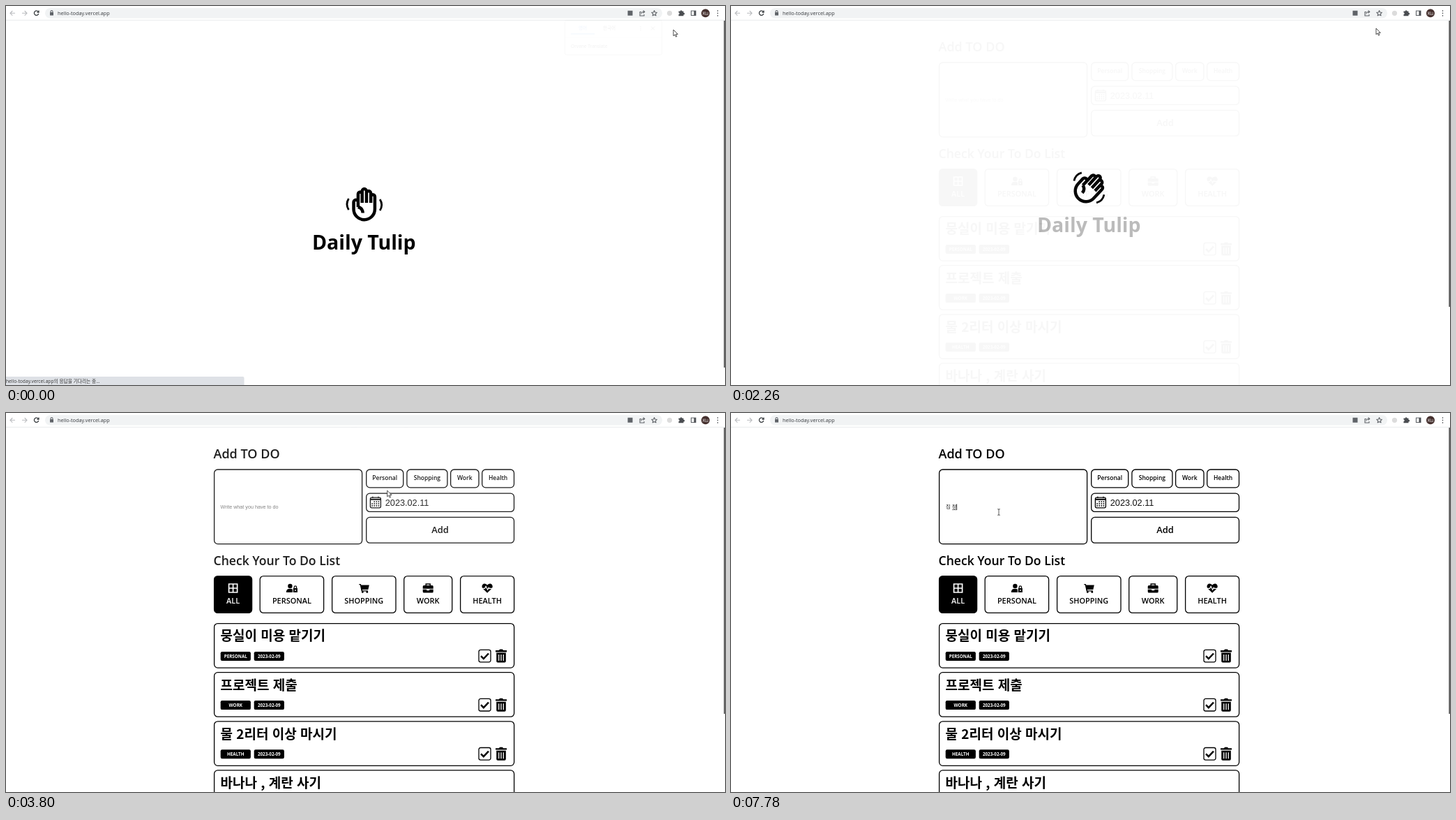
Recreate the animation shown at these times as an HTML page. Size 1031x543 px, loop 8 s.

```html
<!DOCTYPE html>
<html lang="ko">
<head>
<meta charset="utf-8">
<title>To do list</title>
<style>
html, body { margin: 0; width: 100%; height: 100%; overflow: hidden; background: #fff; }
svg { display: block; width: 1031px; height: 543px; }
text { font-family: "Open Sans", "Noto Sans", "Noto Sans CJK KR", "Noto Sans CJK", sans-serif; white-space: pre; }
.b { font-weight: 600; }
.h { font-weight: 700; }
.k { font-family: "Noto Sans CJK KR", "Noto Sans CJK", sans-serif; font-weight: 700; }
.a { font-family: "Liberation Sans", Arial, sans-serif; }
.m { text-anchor: middle; }
.line { fill: none; stroke: #000; stroke-width: 1.3; }
.tool { fill: none; stroke: #5f6368; stroke-width: 1.1; }
</style>
</head>
<body>
<svg viewBox="0 0 1031 543">
  <rect width="1031" height="543" fill="#fff"/>
  <g id="page"></g>
  <g id="typed">
    <text id="hint" class="a" x="307.5" y="137" font-size="7.2" fill="#757575">Write what you have to do</text>
    <text id="word" class="a" x="308" y="137.3" font-size="7.4" fill="#222"></text>
    <path id="under" stroke="#333" stroke-width=".7"/>
    <path id="caret" stroke="#111" stroke-width=".8"/>
  </g>

  <g id="cover">
    <rect width="1031" height="548" y="20" fill="#fff"/>
    <g id="hand" fill="none" stroke="#000" stroke-width="4.5" stroke-linejoin="round">
      <path d="M-8.800 4V-14.500a2.900 2.900 0 0 1 5.800 0M-3-2V-18.800a3.100 3.100 0 0 1 6.200 0V-2M3.200-15.800a3.100 3.100 0 0 1 6.200 0V-2M9.400-10.800a2.900 2.900 0 0 1 5.800 0V7a15.200 15.200 0 0 1-30.400 0V-3a3.200 3.200 0 0 1 6.400 0"/>
      <path d="M-9 4q6.800 1.500 7 8.500"/>
      <path d="M-22.300-8q-5 8 0 16M22.500-7q5 8 0 16" stroke-width="2.800"/>
    </g>
    <text id="name" class="m h" x="513.3" y="348.500" font-size="28.5">Daily Tulip</text>
  </g>

  <path id="thumb" stroke="#555" stroke-width="1.6"/>

  <g id="bar">
    <rect width="1031" height="20" fill="#fff"/>
    <path d="M0 20.300H1031" stroke="#e4e6e8" stroke-width=".8"/>
    <rect x="56" y="3" width="885" height="14.500" rx="7.250" fill="#f1f3f4"/>
    <path class="tool" style="stroke:#b9bbbe" d="M13 10.300H6M9.300 7L6 10.300l3.300 3.300M23 10.300h7M26.700 7l3.300 3.300-3.300 3.300"/>
    <path class="tool" style="stroke:#3c4043;stroke-width:1.300" d="M46.300 8.400A3.200 3.200 0 1 0 46.700 11M47 6.500v2.600h-2.600"/>
    <rect x="63" y="9" width="5" height="4.600" rx=".6" fill="#5f6368"/>
    <path class="tool" d="M64 9V8a1.500 1.500 0 0 1 3 0v1" stroke-width=".9"/>
    <text x="74" y="13" font-size="7.300" fill="#35383c">hello-today.vercel.app</text>
    <rect id="glow" x="886.500" y="3.500" width="17" height="13.500" rx="6.750" fill="#a9acb0"/>
    <rect x="891.500" y="6.700" width="7" height="7" fill="#5f6368"/>
    <path class="tool" d="M911 8.500h-2v5.500h6v-2M910.700 11.500q.3-3 4.500-3.200M913.600 6.300l2.200 2-2.200 2"/>
    <path class="tool" d="M929.600 6.500l1.100 2.500 2.700.3-2 1.800.6 2.700-2.400-1.400-2.400 1.400.6-2.700-2-1.800 2.700-.3z" stroke-linejoin="round"/>
    <circle cx="951.500" cy="10.300" r="3.600" fill="#dcdcdc"/>
    <path fill="#4a4d51" d="M964.500 7.500h2.300a1.300 1.300 0 1 1 2.600 0h2.100v2.300a1.300 1.300 0 1 1 0 2.500v2h-7v-2.300a1.200 1.200 0 1 0 0-2.400z"/>
    <path class="tool" d="M982.500 7h6.500v6.500h-6.500z"/><path d="M986.500 7h2.500v6.500h-2.500z" fill="#4a4d51"/>
    <circle cx="1003" cy="10.300" r="6" fill="#45302e"/>
    <text class="m" x="1003" y="12.700" font-size="6.500" fill="#fff">Ku</text>
    <path d="M1020.500 6.800v.1M1020.500 10.300v.1M1020.500 13.800v.1" stroke="#4a4d51" stroke-width="1.500" stroke-linecap="round"/>
  </g>

  <g id="popup">
    <rect x="801.500" y="20.500" width="139" height="49.500" rx="2" fill="#fff" stroke="#aaa"/>
    <g font-size="6.600" fill="#333">
      <text class="m" x="827" y="34" fill="#1a73e8">영어</text>
      <text class="m" x="865" y="34">한국어</text>
      <text x="810" y="60.300">Orvane Translate</text>
    </g>
    <path d="M810 40h34" stroke="#1a73e8" stroke-width="1.200"/>
    <path d="M802 45.500h138" stroke="#e8e8e8"/>
    <path d="M910 29.500v.1M910 32v.1M910 34.500v.1" stroke="#555" stroke-width="1.300" stroke-linecap="round"/>
    <path d="M925 29.500l5 5m0-5l-5 5" stroke="#555"/>
  </g>

  <g id="status">
    <path d="M0 531h339.500a2 2 0 0 1 2 2v10H0z" fill="#dee1e6"/>
    <text x="0" y="539.700" font-size="6.700" fill="#333">hello-today.vercel.app의 응답을 기다리는 중...</text>
  </g>

  <path id="arrow" d="M0 0V8.800L2 7l1.500 3.200 1.400-.6L3.500 6.400H6.300Z" fill="#fff" stroke="#222" stroke-width=".8"/>
  <path id="beam" d="M-1.800-4.300h1.200q.6 0 .6.600q0-.6.600-.6h1.200M0-4V4M-1.800 4.300h1.200q.6 0 .6-.6q0 .6.600.6h1.200" fill="none" stroke="#333" stroke-width=".8"/>
</svg>
<script>
const $ = id => document.getElementById(id);
const LOOP = 8000;

// ---- page content ----
const box = (x, y, w, h, extra = 'class="line"') =>
  `<rect x="${x}" y="${y}" width="${w}" height="${h}" rx="5" ${extra}/>`;
const label = (s, x, y, size, cls, fill = '#000') =>
  `<text class="${cls}" x="${x}" y="${y}" font-size="${size}" fill="${fill}">${s}</text>`;

const icons = {
  ALL: '<path d="M-6-6H6V6H-6ZM0-6V6M-6 0H6" fill="none" stroke="#fff" stroke-width="1.700"/>',
  PERSONAL: '<circle cx="-2.500" cy="-3" r="3.200"/><path d="M-8 6q0-5 4-5h3q1.500 0 2 .700V6zM2 0h6v6H2z"/><path d="M3.300 0v-1.500a1.700 1.700 0 0 1 3.400 0V0" fill="none" stroke="#000" stroke-width="1.200"/><circle cx="5" cy="3" r=".9" fill="#fff"/>',
  SHOPPING: '<path d="M-7-6h2.500l.5 1.600H7.500L6 2H-2.500l.3 1.300H5.500v1.200H-3.600L-5.600-4.700H-7z"/><circle cx="-2" cy="5.500" r="1.400"/><circle cx="4.500" cy="5.500" r="1.400"/>',
  WORK: '<path d="M-7.500-2.500q0-1.500 1.500-1.500H6q1.500 0 1.500 1.500V.700h-15zM-7.500 1.800h5.500v1.500H2V1.800h5.500V5q0 1.500-1.500 1.500H-6q-1.500 0-1.500-1.500z"/><path d="M-3-4V-6H3V-4" fill="none" stroke="#000" stroke-width="1.500"/>',
  HEALTH: '<path d="M0 6.800L-6.500.400C-9.500-3-6-8.500-1.500-5.700L0-4.400 1.500-5.700C6-8.500 9.500-3 6.500.400Z"/><path d="M-8 .300h4.500l1.500-3 2.500 5 1.600-3 .6 1H8" fill="none" stroke="#fff" stroke-width="1.200"/>'
};

function filterButton([name, x, w]) {
  const on = name === 'ALL', mid = x + w / 2;
  return box(x, 233.6, w, 52.8, `fill="${on ? '#000' : 'none'}" stroke="#000" stroke-width="1.3"`) +
    `<g transform="translate(${mid} 251)">${icons[name]}</g>` +
    label(name, mid, 273, 10.9, 'b m', on ? '#fff' : '#000');
}

function chip(s, x, y) {
  return `<rect x="${x}" y="${y}" width="43.2" height="13" rx="2.2"/>` +
    label(s, x + 21.6, y + 8.8, 6.3, 'h m', '#fff');
}

function card([title, kind], i) {
  const y = 301.6 + 70.1 * i;
  return box(298.6, y, 430, 63.5) + label(title, 307.5, y + 24.8, 19, 'k') +
    chip(kind, 307.7, y + 40.4) + chip('2023-02-09', 355.7, y + 40.4) +
    `<g transform="translate(686.500 ${y + 46.500})">
      <rect x="-8.500" y="-8.800" width="17" height="17.600" rx="2.600" class="line"/>
      <path d="M-5.500 0l3.800 3.900L5.500-3.600" fill="none" stroke="#000" stroke-width="2.500"/>
      <path d="M15.500-8h5l1-1.500h4l1 1.500h5v2.300h-16zM16.700-4.500h13.600V7.500q0 2-2 2h-9.600q-2 0-2-2z"/>
      <path d="M20.200-2V7M23.500-2V7M26.800-2V7" stroke="#fff" stroke-width="1.300"/>
    </g>`;
}

function calendar() {
  let dots = '';
  for (let n = 1; n < 12; n++) {
    dots += `<rect x="${524.3 + n % 4 * 3.1}" y="${126.3 + (n >> 2) * 2.9}" width="1.6" height="1.6"/>`;
  }
  return `<rect x="522.4" y="121.2" width="15" height="14.6" rx="2" class="line"/>
    <path d="M522.400 123.800h15" stroke="#000" stroke-width="2"/>
    <path d="M525.800 119.800v2M534 119.800v2" stroke="#000" stroke-width="1.400"/>` + dots;
}

$('page').innerHTML =
  label('Add TO DO', 297.5, 65, 18, 'b') +
  box(298.6, 81, 212, 106.6) +
  [['Personal', 516.7, 53], ['Shopping', 574.9, 58], ['Work', 637.6, 40.4], ['Health', 682.7, 45.8]]
    .map(([s, x, w]) => box(x, 81, w, 25.8) + label(s, x + w / 2, 96.3, 8.5, 'b m')).join('') +
  box(516.7, 115.2, 211.8, 26.2) + calendar() +
  label('2023.02.11', 543.8, 132.8, 12.7, 'a', '#111') +
  box(516.7, 149.4, 211.8, 36.8) + label('Add', 622.5, 172.2, 12.9, 'b m') +
  label('Check Your To Do List', 297.5, 217.8, 17.6, 'b') +
  [['ALL', 298.6, 54], ['PERSONAL', 364.2, 91.4], ['SHOPPING', 467.6, 91.4], ['WORK', 570.7, 69], ['HEALTH', 651.6, 77]]
    .map(filterButton).join('') +
  [['뭉실이 미용 맡기기', 'PERSONAL'], ['프로젝트 제출', 'WORK'], ['물 2리터 이상 마시기', 'HEALTH'], ['바나나 , 계란 사기', 'SHOPPING']]
    .map(card).join('');

// ---- motion ----
const ramp = (t, from, to) => Math.min(1, Math.max(0, (t - from) / (to - from)));
const START = 900;

// cubic-bezier(.42, 0, .58, 1)
function easeInOut(x) {
  let lo = 0, hi = 1;
  for (let i = 0; i < 20; i++) {
    const s = (lo + hi) / 2;
    if (3 * s * (1 - s) * (1 - s) * .42 + 3 * s * s * (1 - s) * .58 + s * s * s < x) lo = s; else hi = s;
  }
  return lo * lo * (3 - 2 * lo);
}

// eased 0 -> 1 -> 0 ... from START on
function swing(t, half) {
  const p = Math.max(0, t - START) / half % 2;
  return easeInOut(p > 1 ? 2 - p : p);
}

const route = [[0, 957, 34], [120, 957, 34], [800, 925, 32], [3370, 925, 32], [3800, 547, 111],
  [4250, 400, 136], [4600, 379, 139], [4850, 379, 139], [4860, 386, 142], [5230, 386, 142], [5240, 384, 142], [LOOP, 384, 142]];

function pointer(t) {
  const i = route.findIndex(p => p[0] > t), a = route[i - 1], b = route[i];
  const k = ramp(t, a[0], b[0]);
  return [a[1] + (b[1] - a[1]) * k, a[2] + (b[2] - a[2]) * k];
}

const typing = [[0, ''], [6120, 'w'], [6250, 'wl'], [6650, 'w'], [6720, ''], [6850, 'ㅈ'], [6990, '지'],
  [7060, '집'], [7260, '집 '], [7520, '집 ㅊ'], [7650, '집 처'], [7780, '집 청']];

function drawTyping(t) {
  const [since, s] = typing.filter(k => k[0] <= t).pop();
  const word = $('word');
  $('hint').style.display = s ? 'none' : '';
  if (word.textContent !== s) word.textContent = s;
  const end = 308 + (s ? word.getComputedTextLength() : 0.4);
  const composing = s.slice(-1) > '~';
  $('under').setAttribute('d', composing ? `M${end - 6.6} 138.6H${end}` : '');
  const from = Math.max(5310, since);
  const on = t >= 5310 && (t - from) % 960 < 480;
  $('caret').setAttribute('d', on ? `M${end} 130.500V139` : '');
}

function draw(t) {
  const rise = 548 * easeInOut(ramp(t, 1714, 5414));
  const cover = $('cover');
  cover.setAttribute('transform', `translate(0 ${-rise})`);
  cover.setAttribute('opacity', 1 - easeInOut(ramp(t, 1960, 4380)));
  $('hand').setAttribute('transform', `translate(513.700 284) rotate(${45 * swing(t, 1600)})`);
  $('name').setAttribute('opacity', 1 - swing(t, 1000));
  $('thumb').setAttribute('d', `M1030.200 21V${t < 1714 ? 518 : 431}`);

  $('status').setAttribute('opacity', 1 - ramp(t, 700, 820));
  $('popup').setAttribute('opacity', t < 700 ? .06 + .94 * ramp(t, 20, 160) : 1 - .88 * ramp(t, 1320, 1430) - .12 * ramp(t, 1450, 1520));
  $('glow').setAttribute('opacity', ramp(t, 30, 100) - ramp(t, 1480, 1650));

  const [x, y] = pointer(t), inField = x < 510 && y > 81;
  $('arrow').style.display = inField ? 'none' : '';
  $('beam').style.display = inField ? '' : 'none';
  for (const id of ['arrow', 'beam']) $(id).setAttribute('transform', `translate(${x} ${y})`);

  drawTyping(t);
}

const t0 = performance.now();
function tick(now) {
  draw(Math.max(0, now - t0) % LOOP);
  requestAnimationFrame(tick);
}
draw(0);
requestAnimationFrame(tick);
</script>
</body>
</html>
```
